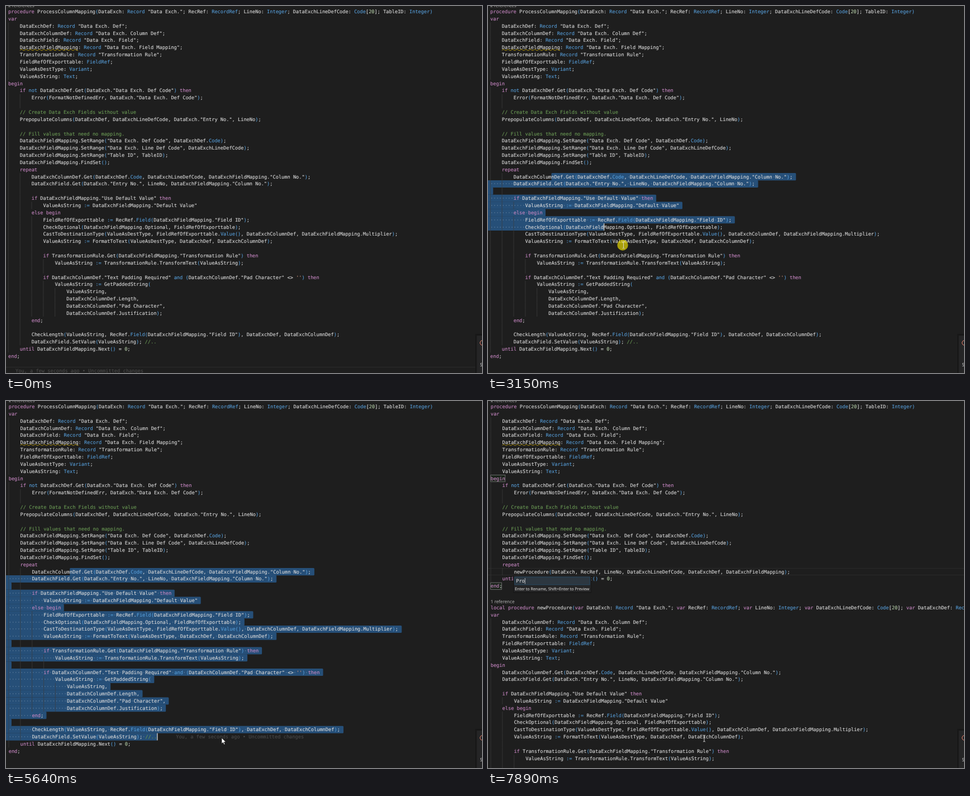
An HTML page for the animation above (8 s loop, 852 by 657 pixels).

```html
<!DOCTYPE html>
<html lang="en">
<head>
<meta charset="utf-8">
<title>Extract procedure</title>
<style>
  html, body { margin: 0; width: 100%; height: 100%; overflow: hidden; background: #1e1e1e; }
  svg { display: block; }
  text { white-space: pre; text-rendering: geometricPrecision; color: #dadada;
    font: 8.658px "DejaVu Sans Mono", "Noto Sans Mono", monospace; }
  text, tspan { fill: currentColor; stroke: currentColor; stroke-width: .12; }
  text.ui { font: 8.1px "Open Sans", "Noto Sans", sans-serif; color: #a0a0a0; }
  text.hint { font-size: 7.2px; color: #ccc; }
  text.item { font-size: 8px; color: #ccc; }
  text.blame { color: #4a4a4a; }
  text.dots { color: #5d7c9b; }
  .key { color: #c586c0; }
  .type { color: #569cd6; }
  .num { color: #b5cea8; }
  .str { color: #ce9178; }
  .note { color: #6a9955; }
  .guide { fill: none; stroke: #404040; stroke-width: .7; }
  .border { fill: none; stroke: #2b2b2b; stroke-width: 1; }
  .sel { fill: #264f78; }
  .match { fill: #33393f; }
  .caret { fill: #d8d8d8; }
  .bracket { fill: #1c251c; stroke: #888; stroke-width: .7; }
</style>
</head>
<body>
<svg width="852" height="657" viewBox="0 0 852 657">
  <g id="editor">
    <g id="under"></g>
    <g id="code"></g>
    <g id="over"></g>
  </g>
  <g>
    <rect x="840" y="587" width="20" height="80" fill="#171717"/>
    <rect x="842.5" y="590" width="20" height="80" fill="#252526"/>
    <circle cx="853" cy="603" r="4.4" fill="none" stroke="#f48771"/>
    <text class="ui item" x="848.5" y="644.5">S</text>
  </g>
  <g id="pointer">
    <circle id="press" cx="-1.5" r="9.7" fill="#ffef00" fill-opacity=".62"/>
    <path id="beam" d="M-2-6q2 0 2 1.5v9q0 1.5-2 1.5M2-6q-2 0-2 1.5M2 6q-2 0-2-1.5" fill="none" stroke="#ddd" stroke-width=".9"/>
    <path id="arrow" d="M-1-1v10.5l2.6-2.3 1.8 4 1.7-.8-1.8-3.8h3.3z" fill="#fff" stroke="#000" stroke-width=".6"/>
  </g>
</svg>
<script>
const LOOP = 8000, CH = 5.212, LH = 12.85, TOP = 3.57, BASE = 9.5;
const $ = id => document.getElementById(id);
const lineTop = n => TOP + n * LH;

const before = `procedure ProcessColumnMapping(DataExch: Record "Data Exch."; RecRef: RecordRef; LineNo: Integer; DataExchLineDefCode: Code[20]; TableID: Integer)
var
    DataExchDef: Record "Data Exch. Def";
    DataExchColumnDef: Record "Data Exch. Column Def";
    DataExchField: Record "Data Exch. Field";
    DataExchFieldMapping: Record "Data Exch. Field Mapping";
    TransformationRule: Record "Transformation Rule";
    FieldRefOfExporttable: FieldRef;
    ValueAsDestType: Variant;
    ValueAsString: Text;
begin
    if not DataExchDef.Get(DataExch."Data Exch. Def Code") then
        Error(FormatNotDefinedErr, DataExch."Data Exch. Def Code");

    // Create Data Exch Fields without value
    PrepopulateColumns(DataExchDef, DataExchLineDefCode, DataExch."Entry No.", LineNo);

    // Fill values that need no mapping.
    DataExchFieldMapping.SetRange("Data Exch. Def Code", DataExchDef.Code);
    DataExchFieldMapping.SetRange("Data Exch. Line Def Code", DataExchLineDefCode);
    DataExchFieldMapping.SetRange("Table ID", TableID);
    DataExchFieldMapping.FindSet();
    repeat
        DataExchColumnDef.Get(DataExchDef.Code, DataExchLineDefCode, DataExchFieldMapping."Column No.");
        DataExchField.Get(DataExch."Entry No.", LineNo, DataExchFieldMapping."Column No.");

        if DataExchFieldMapping."Use Default Value" then
            ValueAsString := DataExchFieldMapping."Default Value"
        else begin
            FieldRefOfExporttable := RecRef.Field(DataExchFieldMapping."Field ID");
            CheckOptional(DataExchFieldMapping.Optional, FieldRefOfExporttable);
            CastToDestinationType(ValueAsDestType, FieldRefOfExporttable.Value(), DataExchColumnDef, DataExchFieldMapping.Multiplier);
            ValueAsString := FormatToText(ValueAsDestType, DataExchDef, DataExchColumnDef);

            if TransformationRule.Get(DataExchFieldMapping."Transformation Rule") then
                ValueAsString := TransformationRule.TransformText(ValueAsString);

            if DataExchColumnDef."Text Padding Required" and (DataExchColumnDef."Pad Character" <> '') then
                ValueAsString := GetPaddedString(
                    ValueAsString,
                    DataExchColumnDef.Length,
                    DataExchColumnDef."Pad Character",
                    DataExchColumnDef.Justification);
        end;

        CheckLength(ValueAsString, RecRef.Field(DataExchFieldMapping."Field ID"), DataExchDef, DataExchColumnDef);
        DataExchField.SetValue(ValueAsString); //..
    until DataExchFieldMapping.Next() = 0;
end;`.split('\n');

const CALL = 23, LAST = 46;
const upper = [
  ...before.slice(0, CALL),
  '        newProcedure(DataExch, RecRef, LineNo, DataExchLineDefCode, DataExchDef, DataExchFieldMapping);',
  ...before.slice(LAST + 1), ''];
const lower = [
  'local procedure newProcedure(var DataExch: Record "Data Exch."; var RecRef: RecordRef; var LineNo: Integer; var DataExchLineDefCode: Code[20]; var DataExchDef: Record "Data Exch. Def")',
  'var', ...before.slice(3, 5), ...before.slice(6, 10), 'begin',
  ...before.slice(CALL, LAST + 1).map(line => line.slice(4))];
const after = [...upper, ...lower].slice(0, 52);
const spaced = [...upper, '', ...lower].slice(0, 52);

const TOKENS = /("[^"]*")|('[^']*')|(\/\/.*)|\b(procedure|local|var|begin|end|if|then|else|repeat|until)\b|(:=|[()]|\b(?:not|and|Record|RecordRef|FieldRef|Variant|Text|Integer|Code|Field(?=\()|Value(?=\())\b)|\b(\d+)\b/g;
const KINDS = ['', 'str', 'note', 'key', 'type', 'num'];
const escape = s => s.replace(/&/g, '&amp;').replace(/</g, '&lt;').replace(/>/g, '&gt;');

function colour(line) {
  let html = '', at = 0;
  for (const m of line.matchAll(TOKENS)) {
    const kind = KINDS[m.slice(1).findIndex(Boolean)];
    html += escape(line.slice(at, m.index)) +
      (kind ? `<tspan class="${kind}">${escape(m[0])}</tspan>` : escape(m[0]));
    at = m.index + m[0].length;
  }
  return html + escape(line.slice(at));
}

const text = (x, y, html, cls = '') => `<text class="${cls}" x="${x}" y="${y}">${html}</text>`;
const rect = (x, y, w, h, attrs) => `<rect x="${x}" y="${y}" width="${w}" height="${h}" ${attrs}/>`;
const rowText = (n, x, html, cls) => text(x, lineTop(n) + BASE, html, cls);
const indent = line => line.search(/\S/);

// A blank line takes its guide depth from its neighbours.
function depth(lines, n) {
  if (lines[n]) return indent(lines[n]) / 4;
  let up = n, down = n;
  while (up > 0 && !lines[up]) up--;
  while (down < lines.length - 1 && !lines[down]) down++;
  const a = indent(lines[up]) / 4, b = Math.max(0, indent(lines[down])) / 4;
  return a === b ? a : Math.min(a, b) + 1;
}

function drawCode(lines, plainFrom = Infinity) {
  let guides = '', rows = '';
  lines.forEach((line, n) => {
    const levels = depth(lines, n);
    for (let i = 0; i < levels; i++) guides += `M${i * 4 * CH + .3} ${lineTop(n)}v${LH}`;
    if (!line) return;
    const body = line.trimStart();
    rows += rowText(n, indent(line) * CH, n >= plainFrom ? escape(body) : colour(body));
  });
  let wave = `M${4 * CH} 79.5`;
  for (let i = 0; i < 26; i++) wave += `l2 ${i % 2 ? 1.6 : -1.6}l2 0`;
  return `<path class="guide" d="${guides}"/>${rows}` +
    `<path d="${wave}" fill="none" stroke="#cca700" stroke-width=".8"/>` +
    text(0, 1.7, '2 references', 'ui');
}

const views = {
  before: drawCode(before),
  after: drawCode(after, upper.length),
  spaced: drawCode(spaced)
};

// Pointer moves: start, end, number of steps, x, y reached.
const MOVES = [
  [210, 380, 3, 572, 348],
  [670, 1220, 8, 250, 321],
  [1520, 2080, 8, 115, 301],
  [2380, 2450, 2, 129, 308],
  [2520, 2810, 5, 195, 380],
  [3060, 3060, 1, 207, 395],
  [3150, 3150, 1, 242.5, 428],
  [3220, 3350, 3, 300, 515],
  [3580, 3980, 6, 391, 588],
  [4070, 4070, 1, 391.5, 596],
  [4140, 4380, 4, 386, 607],
  [4530, 4850, 5, 387, 604]
];

function pointerAt(t) {
  let x = 815, y = 348;
  for (const [start, end, steps, toX, toY] of MOVES) {
    if (t < start) break;
    const done = Math.min(steps, 1 + Math.floor((t - start) * (steps - 1) / (end - start || 1) + 1e-6)) / steps;
    x += (toX - x) * done;
    y += (toY - y) * done;
  }
  return [x, y];
}

const within = (t, from, to) => t >= from && t < to;
const shiftAt = t => t < 3220 ? 4 : 4.7;
const caret = (line, col) => rect(col * CH - .3, lineTop(line), 1.3, LH, 'class="caret"');
const currentLine = n => rect(-9, lineTop(n) + .5, 880, LH - 1, 'class="border"');
const blame = (n, x) => rowText(n, x, 'You, a few seconds ago • Uncommitted changes', 'blame');

function selection(lines, l0, c0, l1, c1) {
  let html = '';
  for (let n = l0; n <= l1; n++) {
    const from = n === l0 ? c0 : 0, to = n === l1 ? c1 : lines[n].length;
    const x0 = n === l0 ? c0 * CH : -8, x1 = (n === l1 ? to : to + 1) * CH;
    html += rect(x0, lineTop(n), Math.max(0, x1 - x0), LH + .2, 'class="sel" rx="1.5"');
    const dots = lines[n].slice(from, to).replace(/./g, c => c === ' ' ? '·' : ' ');
    const lead = indent(dots);
    if (lead >= 0) html += rowText(n, (from + lead) * CH, dots.slice(lead).trimEnd(), 'dots');
  }
  return html;
}

function matches(word) {
  let html = '';
  before.forEach((line, n) => {
    for (let i = line.indexOf(word); i >= 0; i = line.indexOf(word, i + 1))
      html += rect(i * CH, lineTop(n), word.length * CH, LH, 'class="match"');
  });
  return html;
}

function dragSelection(t) {
  const [x, y] = pointerAt(t - 80);
  const line = Math.min(LAST, Math.floor((y - TOP) / LH));
  const col = Math.min(before[line].length, Math.max(0, Math.round((x - shiftAt(t)) / CH)));
  const word = line === CALL ? before[line].slice(21, col) : '';
  const caretOn = t < 4460 || Math.floor((t - 4410) / 500) % 2 === 0;
  return [
    (word.length > 1 ? matches(word) : '') + selection(before, CALL, 21, line, col),
    caretOn ? caret(line, col) : ''];
}

const ACTIONS = ['Extract to procedure', 'Extract to local procedure with parameters', 'Surround with begin and end',
  'Add documentation comment', 'Suppress warning for the selected lines', 'Show all code actions'];

function menu() {
  const x = 265.5, y = 483;
  return rect(x, y, 308, 111, 'fill="#303031" stroke="#1a1a1a" stroke-width=".7"') +
    rect(x, y + 3, 308, 17.5, 'fill="#094771"') +
    ACTIONS.map((label, i) => text(x + 16, y + 14.6 + i * 17.5, label, 'ui item')).join('');
}

function renameBox(t) {
  const name = t < 7570 ? 'newProcedure' : 'Pro'.slice(0, t < 7740 ? 1 : t < 7890 ? 2 : 3);
  const x = 41.5, w = name.length * CH;
  return rect(x - 1, 312.5, 140, 31, 'fill="#161616"') +
    rect(x, 313, 138, 29, 'fill="#252526"') +
    rect(x + 1.5, 315, 134.5, 14, 'fill="#2d3740" stroke="#24506f" stroke-width=".7"') +
    (t < 7570 ? rect(45.5, 317, w, 11, 'class="sel"') : '') +
    text(45.5, 325.2, name) +
    rect(45.5 + w, 317, .8, 10.5, 'class="caret"') +
    text(43.3, 339, 'Enter to Rename, Shift+Enter to Preview', 'ui hint');
}

function scene(t) {
  let under = '', over = '';
  if (t < 2380) {
    under += currentLine(50);
    over += blame(50, 13);
  } else if (t < 6570) {
    const [marks, bar] = dragSelection(t);
    under += marks;
    over += bar;
    if (t >= 5640) over += blame(LAST, before[LAST].length * CH + 33.7);
    if (within(t, 5715, 6100)) over += menu();
  } else if (within(t, 6970, 7180)) {
    const end = after[CALL].length;
    under += selection(after, CALL, 8, CALL, end);
    over += caret(CALL, end) + blame(CALL, end * CH + 33.7);
  } else if (t >= 7180) {
    under += currentLine(CALL) +
      rect(0, lineTop(10) + .3, 5 * CH, LH - .6, 'class="bracket"') +
      rect(0, lineTop(25) + .3, 4 * CH - 1, LH - .6, 'class="bracket"');
    if (t >= 7820) over += text(0, lineTop(27) + 11, '1 reference', 'ui');
    if (t >= 7340) over += renameBox(t);
  }
  return { under, over, code: views[t < 6970 ? 'before' : t < 7110 ? 'after' : 'spaced'] };
}

const shown = {};
const show = (id, on) => $(id).setAttribute('visibility', on ? 'visible' : 'hidden');

function render(t) {
  const layers = scene(t);
  for (const id in layers)
    if (shown[id] !== layers[id]) $(id).innerHTML = shown[id] = layers[id];
  $('editor').setAttribute('transform', `translate(${shiftAt(t)} 0)`);
  $('pointer').setAttribute('transform', `translate(${pointerAt(t).join(' ')})`);
  const arrow = within(t, 5640, 6490);
  show('press', within(t, 2230, 4530));
  show('beam', t >= 210 && !arrow);
  show('arrow', arrow);
}

const began = performance.now();
function tick() {
  render((performance.now() - began) % LOOP);
  requestAnimationFrame(tick);
}
tick();
</script>
</body>
</html>
```
